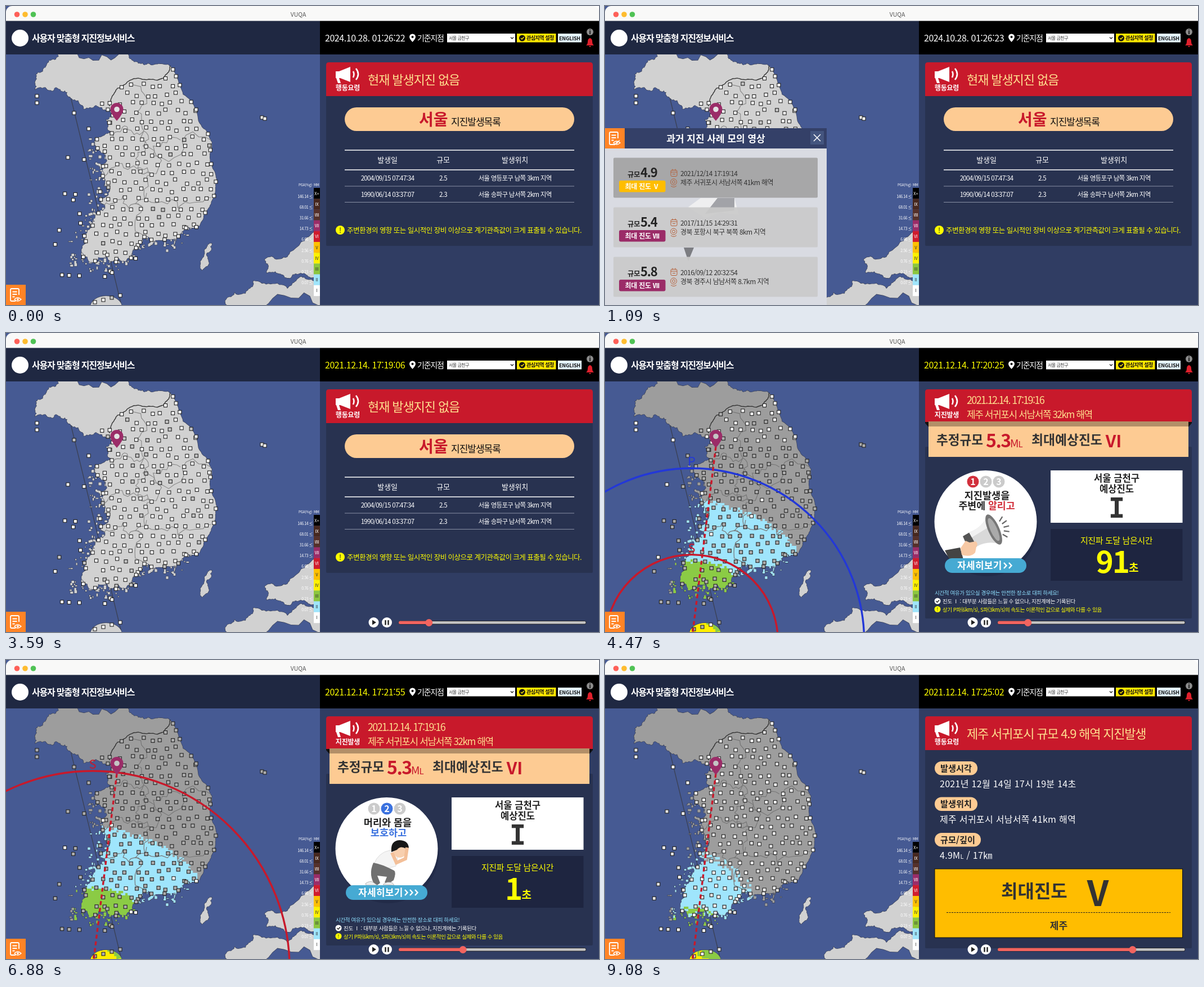
Animation, 1054 px wide and 531 px high, one loop 9.15 s. Source, as an HTML page with a canvas:

```html
<!DOCTYPE html>
<html lang="ko">
<meta charset="utf-8">
<style>
html,body{margin:0;width:1054px;height:531px;overflow:hidden;background:#fff}
canvas,svg{position:absolute;left:0;top:0}
svg{font-family:"Noto Sans CJK KR","Noto Sans CJK",sans-serif;white-space:pre}
</style>
<canvas id="map" width="558" height="531"></canvas>
<svg id="ui" width="1054" height="531"></svg>
<script>
const LOOP = 9150;
const $ = id => document.getElementById(id);
const show = (id, on) => $(id).setAttribute('display', on ? 'inline' : 'none');
const move = (id, y) => $(id).setAttribute('transform', `translate(0 ${y})`);
const hash = (a, b = 0) => { const v = Math.sin(a * 127.1 + b * 311.7) * 43758.5453; return v - Math.floor(v); };
let seed = 7;
const rnd = () => hash(seed++, 3);
const times = (n, f) => Array.from({ length: n }, (_, i) => f(i));

// ---------- markup helpers ----------
const T = (x, y, size, text, fill = '#fff', extra = '') => `<text x="${x}" y="${y}" font-size="${size}" fill="${fill}" ${extra}>${text}</text>`;
const R = (x, y, w, h, fill, rx = 0, extra = '') => `<rect x="${x}" y="${y}" width="${w}" height="${h}" fill="${fill}" rx="${rx}" ${extra}/>`;
const C = (x, y, r, fill, extra = '') => `<circle cx="${x}" cy="${y}" r="${r}" fill="${fill}" ${extra}/>`;
const P = (d, fill, stroke = 'none', w = 1) => `<path d="${d}" fill="${fill}" stroke="${stroke}" stroke-width="${w}"/>`;
const G = (id, body) => `<g id="${id}">${body}</g>`;
const L = (x, y, x2, color, w) => P(`M${x} ${y}H${x2}`, 'none', color, w);
const mid = 'text-anchor="middle" ', bold = 'font-weight="700" ', light = 'font-weight="300" ';
const ls = v => `letter-spacing="${v}" `;
const RED = '#c8192b', PEACH = '#fdcb93', CARD = '#283250', PALE = '#ffe08f', PURPLE = '#9b2c68', YELLOW = '#ffff00', INK = '#333';

// ---------- interface ----------
const header = R(0, 0, 1054, 40, '#f9f9f8', 11)
  + ['#fe6058', '#febc2f', '#4fc254'].map((c, i) => C(19.5 + i * 14.5, 15, 4.8, c)).join('')
  + T(519.5, 18.5, 10.5, 'VUQA', '#555', mid)
  + R(0, 26.5, 558, 59.5, '#1f2842') + R(558, 26.5, 496, 59.5, '#000') + R(558, 86, 496, 445, '#303d63')
  + C(25, 57, 15, '#fff')
  + T(46, 62.5, 16, '사용자 맞춤형 지진정보서비스', '#fff', bold + ls(-1.2))
  + `<text id="clock" x="567" y="63" font-size="16" letter-spacing="-.45"></text>`
  + P('M722.5 64Q717 58 717 55a5.5 5.5 0 0 1 11 0q0 3-5.5 9zM722.5 53a2 2 0 1 0 .1 0z', '#fff')
  + T(731, 62, 14, '기준지점', '#fff', ls(-1.2))
  + R(784, 49, 121, 15.5, '#fff') + T(787, 59.8, 8, '서울 금천구', INK, ls(-.5)) + P('M897 55.5l2.5 2.5 2.5-2.5', 'none', '#222', 1.3)
  + R(908, 49, 69.5, 15.5, '#ffe600') + C(917.5, 57, 5.5, '#111') + P('M915 57l2 2 3.5-4', 'none', '#ffe600', 1.4)
  + T(925, 60.3, 9, '관심지역 설정', '#111', bold + ls(-.5))
  + R(981, 49, 42, 15.5, '#e3f4fd') + T(1002, 60.5, 9, 'ENGLISH', '#111', mid + bold + ls(-.2))
  + C(1038, 46, 6, '#8b8b8b') + T(1038, 49.7, 10, 'i', '#000', mid + bold)
  + P('M1031 70q3-2 3-7t4-6q4 1 4 6t3 7zM1036 71h4q-2 4-4 0z', '#e0202c');

const legendNames = 'X+,Ⅸ,Ⅷ,Ⅶ,Ⅵ,Ⅴ,Ⅳ,Ⅲ,Ⅱ,Ⅰ'.split(',');
const legendColors = '#000,#46281f,#55302a,#9b2c68,#d01c2d,#ffc000,#fff100,#8cc63f,#9fe5fc,#fff'.split(',');
const pga = '146.14,68.01,31.66,14.73,6.66,2.56,0.76,0.23,0.07'.split(',');
const legend = T(520, 320, 6.2, 'PGA(%g)', '#fff', ls(-.2)) + T(547, 320, 6.2, 'MM', '#fff', ls(-.2))
  + legendNames.map((n, i) => R(547, 323 + i * 19.2, 11, 19.3, legendColors[i])
    + T(552.5, 335.5 + i * 19.2, 7.5, n, i < 5 ? '#fff' : INK, mid)).join('')
  + pga.map((v, i) => T(545, 340.5 + i * 19.2, 7, v + ' ≤', '#fff', 'text-anchor="end" ' + ls(-.4))).join('');

const horn = P('M586 116h6l20-8v27l-18-7h-2l3 9h-5l-3-9h-1z', '#fff')
  + P('M617 116q3 5 0 11M622 111q8 10 0 20', 'none', '#fff', 2.6);
const banner = (label, body) => P('M569 160v-55q0-5 5-5h464q5 0 5 5v55z', RED) + horn
  + T(607.5, 150, 12, label, '#fff', mid + bold + ls(-.2)) + body;
const bang = (x, y, r) => C(x, y, r, YELLOW) + T(x, y + r * .62, r * 1.6, '!', '#222', mid);

const row = (y, size, cells, gap) => cells.map((c, i) => T([678, 777, 904.5][i], y, size, c, '#fff', mid + ls(gap))).join('');
const rules = [256, 291, 320, 348.5].map((y, i) => L(602, y, 1010, i < 2 ? '#fff' : '#8990a5', i < 2 ? 1.5 : 1)).join('');
const idle = R(569, 150, 474, 276, CARD, 2)
  + banner('행동요령', T(643, 138.5, 22, '현재 발생지진 없음', PALE, light + ls(-1.1)))
  + R(602, 180, 408, 42, PEACH, 21) + T(734, 212, 28, '서울', RED, bold) + T(791, 212, 17, '지진발생목록', '#111', ls(-1))
  + rules + row(278, 13, ['발생일', '규모', '발생위치'], -.2)
  + row(310, 11.5, ['2004/09/15 07:47:34', '2.5', '서울 영등포구 남쪽 3km 지역'], -.7)
  + row(338.5, 11.5, ['1990/06/14 03:37:07', '2.3', '서울 송파구 남서쪽 2km 지역'], -.7)
  + bang(594, 398, 8)
  + T(606, 402.5, 12.5, '주변환경의 영향 또는 일시적인 장비 이상으로 계기관측값이 크게 표출될 수 있습니다.', YELLOW, ls(-.52));

const steps = (n, color) => [1, 2, 3].map(i => C(631 + 23 * i, 264, 10.5, i == n ? color : '#cbcbcb')
  + T(631 + 23 * i, 270, 16, i, '#fff', mid + bold)).join('');
const mouth = (rx, ry, fill) => `<ellipse cx="691" cy="349" rx="${rx}" ry="${ry}" fill="${fill}" transform="rotate(-24 691 349)"/>`;
const tipShout = steps(1, '#d2303c')
  + T(679, 295, 17.5, '지진발생을', '#222', mid + bold)
  + T(678.5, 313, 17.3, '주변에 <tspan fill="#d2303c">알리고</tspan>', '#222', mid + bold)
  + P('M604 386l27-5 6 21h-25z', '#444') + P('M636 361l12-7 13 25-15 5z', '#555')
  + P('M647 354q24-8 33-31l24 52q-24-7-43 4z', '#d9d9d9') + P('M647 354q24-8 33-31l8 18-36 22z', '#f1f1f1')
  + mouth(10, 29, '#777') + mouth(6, 22, '#aaa')
  + P('M632 382l9-13 7 3 11-2q5 4 1 10l-2 10q-8 9-24 4z', '#f7c9a5')
  + times(5, i => `<path d="M692 349m17 0h10" stroke="#666" stroke-width="2.2" transform="rotate(${i * 22 - 58} 692 349)"/>`).join('');
const tipCrouch = steps(2, '#3b72df')
  + T(678.5, 295, 17.5, '머리와 몸을', '#222', mid + bold) + T(680, 313, 17.5, '보호하고', '#3b72df', mid + bold)
  + P('M654 362q8-20 28-24l16 4-5 24-30 8z', '#f4f4f4', '#ddd') + C(700, 340, 11, '#f8cfae')
  + P('M685 341q-2-20 14-21 16 0 17 14l-5 1q-10-6-16 2z', '#171717')
  + P('M686 342l8 18 16-7 3-20', 'none', '#f3bf98', 6)
  + P('M653 360q14 2 37 14 4 3-1 17l-10 7-6-3 4-10-17-2 5 13-8 6q-14-20-4-42z', '#707070')
  + P('M639 397q8-6 14-2l7 5h-20zM670 399q7-7 17-3l3 4z', '#eee', '#999', .7);
const alert = R(569, 202, 474, 305, CARD, 2)
  + banner('지진발생', T(643, 126, 18, '2021.12.14. 17:19:16', PALE, light + ls(-1.65))
    + T(643, 151, 17, '제주 서귀포시 서남서쪽 32km 해역', PALE, light + ls(-1.4)))
  + P('M569 158h474v2l-6 7h-462l-6-7z', '#111') + R(575, 157, 462, 63, PEACH) + R(575, 157, 462, 9, '#b38f68')
  + T(589, 198, 22.6, '추정규모', INK, bold) + T(677, 203, 32, '5.3', RED, bold + ls(-1.5))
  + T(720, 203, 19, 'M<tspan font-size="15">L</tspan>', RED, light + ls(-1))
  + T(758, 198, 22.8, '최대예상진도', INK, bold) + T(904, 203, 30, 'Ⅵ', RED, mid + bold)
  + C(679, 341, 91, '#1c2440', 'opacity=".5"') + C(676.5, 335, 91, '#fff')
  + G('tip1', tipShout) + G('tip2', tipCrouch)
  + R(604, 400, 145, 26, '#46aad3', 13) + T(626, 418.5, 17, '자세히보기', '#fff', bold + ls(.3))
  + times(3, i => `<path id="arrow${i}" d="M${709 + i * 9} 408l4.5 5-4.5 5" fill="none" stroke="#fff" stroke-width="2.4"/>`).join('')
  + R(792, 244, 234.5, 93, '#fff') + T(909.5, 264, 16.6, '서울 금천구', '#222', mid + bold) + T(909.5, 283, 16.6, '예상진도', '#222', mid + bold)
  + T(909.5, 328, 49, 'I', INK, mid + bold + 'font-family="DejaVu Sans Mono,monospace" ')
  + R(792, 348, 234.5, 92, '#1e2540') + T(909, 374, 15, '지진파 도달 남은시간', YELLOW, mid + ls(-.4))
  + T(909.5, 425.5, 53, '<tspan id="left"></tspan><tspan font-size="19" dy="-2">초</tspan>', YELLOW, mid + bold + ls(-2))
  + T(586, 465, 9.5, '시간적 여유가 있으실 경우에는 안전한 장소로 대피 하세요!', '#8fe0ff', ls(-.35))
  + C(591, 476, 5.5, '#fff') + P('M588.5 476l2 2.2 3.5-4', 'none', '#222', 1.4)
  + T(600, 479.5, 9.5, '진도 Ⅰ : 대부분 사람들은 느낄 수 없으나, 지진계에는 기록된다', '#fff', ls(-.35))
  + bang(591, 490.5, 5.5)
  + T(600, 494.5, 9.5, '상기 P파(6km/s), S파(3km/s)의 속도는 이론적인 값으로 실제와 다를 수 있음', YELLOW, ls(-.5));

const field = (y, w, name, value) => R(586, y, w, 24.5, PEACH, 12) + T(586 + w / 2, y + 17.5, 15.2, name, '#222', mid + bold)
  + T(595, y + 45.5, 16, value, '#fff', ls(.3));
const report = R(569, 150, 474, 362, CARD, 2)
  + banner('행동요령', T(643, 138.5, 22, '제주 서귀포시 규모 4.9 해역 지진발생', PALE, light + ls(-1.2)))
  + field(180, 76, '발생시각', '2021년 12월 14일 17시 19분 14초')
  + field(243.5, 76, '발생위치', '제주 서귀포시 서남서쪽 41km 해역')
  + field(307, 82, '규모/깊이', '4.9M<tspan font-size="11">L</tspan> / 17㎞')
  + R(586, 371, 440.5, 122, '#ffbd00', 0, 'stroke="#111"')
  + T(704, 422, 32, '최대진도', INK, bold) + T(876, 437, 62, 'Ⅴ', INK, mid + bold)
  + `<path d="M607 448.5H1005" stroke="#222" stroke-dasharray="3 1.5"/>` + T(806.5, 477.5, 17, '제주', INK, mid + bold);

const player = C(653.5, 514, 9, '#fff') + P('M651 509.5l7 4.5-7 4.5z', '#222')
  + C(677, 514, 9, '#fff') + P('M674.5 510v8.5M679.5 510v8.5', 'none', '#222', 2.4)
  + R(698, 511.5, 333, 5.5, '#c3c3c3', 2.7, 'stroke="#111" stroke-width=".8"')
  + `<rect id="bar" x="698" y="511.5" height="5.5" rx="2.7" fill="#f2645f"/><circle id="knob" cy="514.5" r="6.5" fill="#f2645f"/>`;

// past events: the first one is hovered
const outline = 'stroke="#b5603a"';
const event = ([mag, roman, date, place], i) => {
  const y = 52.5 + 88 * i;
  return R(15, y, 363, 71, i ? '#cacaca' : '#a3a3a3', 2, 'opacity=".92"')
    + T(40, y + 34, 12.5, '규모', '#222', bold + ls(-.5)) + T(63, y + 34.5, 22, mag, '#222', bold + ls(-1.2))
    + R(25, y + 40.5, 82.5, 20.5, i ? PURPLE : '#ffbd00', 3) + T(66, y + 55.5, 12, '최대 진도 ' + roman, '#fff', mid + bold + ls(-.3))
    + R(117, y + 22, 11, 11, 'none', 2, outline) + P(`M117 ${y + 25.5}h11M120 ${y + 20}v3M125 ${y + 20}v3M120 ${y + 29}h5`, 'none', '#b5603a')
    + C(122, y + 43, 5.5, 'none', outline) + C(122, y + 43, 2.5, 'none', outline) + P(`M117 ${y + 50}q5 4 10 0`, 'none', '#b5603a')
    + T(134, y + 32, 12, date, INK, ls(-.6)) + T(134, y + 48.5, 12, place, INK, ls(-.6));
};
const body = R(0, 36, 394, 278, '#d9dbe2')
  + P('M170 124h60l8 30-34-4-26 10-30-20z', '#efeff0') + P('M200 124h30v22l-52 6z', '#a2a3a8') + P('M140 212h18l-10 24-4-12z', '#7c7d82')
  + [['4.9', 'Ⅴ', '2021/12/14 17:19:14', '제주 서귀포시 서남서쪽 41km 해역'],
    ['5.4', 'Ⅶ', '2017/11/15 14:29:31', '경북 포항시 북구 북쪽 8km 지역'],
    ['5.8', 'Ⅶ', '2016/09/12 20:32:54', '경북 경주시 남남서쪽 8.7km 지역']].map(event).join('');
const heading = R(0, 0, 394, 36, '#344068') + T(197, 24.5, 17, '과거 지진 사례 모의 영상', '#fff', mid + bold)
  + G('close', R(365, 5, 24, 24, '#44557f') + P('M371 11l12 12M383 11l-12 12', 'none', '#fff', 1.5));
const tab = R(0, 0, 35, 36, '#ff8426')
  + P('M17 29h-7q-2 0-2-2V9q0-2 2-2h11q2 0 2 2v9M11.5 12.5h8M11.5 17h8M11.5 21.5h4', 'none', '#fff', 1.8)
  + P('M15 26q5.500-6 12 0-6.500 6-12 0z', '#ff8426', '#fff', 1.4) + C(21, 26, 1.8, '#fff')
  + G('slash', P('M16 30l10-8.500', 'none', '#fff', 1.5));

$('ui').innerHTML = legend + G('list', G('body', body) + G('heading', heading)) + G('tab', tab) + header
  + G('idle', idle) + G('alert', alert) + G('report', report) + G('player', player);

// ---------- map ----------
const g = $('map').getContext('2d');
// midpoint displacement; amp(x) sets how ragged the line gets
const rough = (pts, amp, closed) => {
  for (let n = 0; n < 4; n++) pts = pts.flatMap((p, i) => {
    const q = pts[i + 1] || (closed ? pts[0] : null);
    if (!q) return [p];
    const k = (rnd() - .5) * amp(p[0]);
    return [p, [(p[0] + q[0]) / 2 - (q[1] - p[1]) * k, (p[1] + q[1]) / 2 + (q[0] - p[0]) * k]];
  });
  return pts;
};
const toPath = (pts, closed) => {
  const p = new Path2D();
  pts.forEach(q => p.lineTo(...q));
  if (closed) p.closePath();
  return p;
};
const ragged = x => x < 260 ? .62 : .2;
const coast = rough([[95, 80], [72, 106], [54, 126], [52, 148], [92, 146], [122, 166], [160, 176], [188, 180], [178, 202], [188, 226],
  [158, 246], [176, 280], [172, 302], [184, 330], [172, 364], [154, 390], [136, 430], [150, 455], [180, 442], [204, 452], [230, 430],
  [246, 410], [262, 418], [302, 414], [320, 394], [344, 390], [366, 345], [373, 312], [362, 270], [366, 242], [338, 184], [302, 124],
  [288, 104], [250, 104], [222, 94], [214, 80]], ragged, true);
const korea = toPath(coast, true);
korea.ellipse(178, 535, 28, 20, 0, 0, 7);
const isSouthWest = ([x, y]) => y > 235 && (x < 215 || y > 385) && x < 330;
// islets are wound like the coast, so overlaps stay filled
const isles = new Path2D();
coast.filter(isSouthWest).forEach(([x, y]) => {
  isles.rect(x + (rnd() - .7) * 34, y + (rnd() - .35) * 26, -1 - rnd() * 4, 1 + rnd() * 4);
});
const abroad = [
  [[565, 396], [545, 403], [505, 437], [460, 450], [464, 474], [500, 483], [530, 474], [565, 484]],
  [[565, 486], [530, 482], [500, 502], [440, 488], [430, 505], [390, 527], [400, 540], [565, 540]],
  [[366, 422], [352, 445], [348, 469], [358, 462]]
].map(a => toPath(rough(a, () => .45, true), true));
const provinces = [
  [[190, 232], [245, 222], [220, 136]], [[245, 222], [364, 238]], [[245, 222], [235, 292], [258, 298]],
  [[176, 302], [258, 298], [310, 238]], [[258, 298], [246, 408]], [[174, 354], [240, 356]], [[250, 332], [364, 340]]
].map(a => toPath(rough(a, () => .75)));
const border = toPath(rough([[184, 178], [198, 146], [220, 132], [280, 128], [292, 106]], () => .25));

// stations: a jittered grid on land, the coastline, and a scatter at sea
const isSouth = (x, y) => x < 168 ? y > 236 : y > (x < 200 ? 166 : x < 270 ? 138 : 110);
const stations = [[55, 160], [55, 172], [121, 190], [455, 198], [460, 200], [110, 269], [147, 218]];
for (let y = 126, r = 0; y < 450; y += 15.5, r++)
  for (let x = 160 + r % 2 * 9; x < 368; x += 18) {
    const px = x + (rnd() - .5) * 8, py = y + (rnd() - .5) * 8;
    if (isSouth(px, py) && g.isPointInPath(korea, px, py)) stations.push([px, py]);
  }
coast.forEach(([x, y], i) => { if (i % 12 == 0 && isSouth(x, y)) stations.push([x, y]); });
times(34, () => [82 + rnd() * 150, 262 + rnd() * 222])
  .filter(([x, y]) => x + y > 400 && !g.isPointInPath(korea, x, y)).forEach(p => stations.push(p));
times(4, i => stations.push([158 + i * 15, 526 - i * 4]));

const EPI = [154, 547], PIN = [197, 202];
// blocky intensity areas: cells whose noisy distance from the epicentre falls within a band
const zones = (bands, noise, squeeze) => bands.map(([r, color], i) => {
  const p = new Path2D();
  for (let y = 290; y < 531; y += 4) for (let x = 120; x < 380; x += 4) {
    const d = Math.hypot((x + 2 - EPI[0]) * squeeze, y + 2 - EPI[1]) + (hash(x >> 2, y >> 2) - .5) * noise;
    if (d < r && d >= (bands[i + 1] || [0])[0]) p.rect(x, y, 4.2, 4.2);
  }
  return [p, color];
});
const BLUE = '#9fe5fc', GREEN = '#8bcb45', GOLD = '#ffee00';
const areas = [[],
  zones([[248, BLUE], [143, GREEN], [46, GOLD]], 10, 1),
  zones([[200, BLUE], [102, GREEN], [36, GOLD]], 26, 1.4)];

function ring(r, color, name) {
  g.strokeStyle = g.fillStyle = color;
  g.lineWidth = 3.4;
  g.beginPath();
  g.arc(...EPI, r, 0, 7);
  g.stroke();
  g.font = '22px "Noto Sans CJK KR",sans-serif';
  g.textAlign = 'center';
  g.fillText(name, EPI[0], EPI[1] - r - 4);
}

// share of stations still quiet (white) in each scene; the shaking turns them grey
function tone(i, y, mode, s, tick) {
  const quiet = mode == 0 ? (s || tick > 9 ? .86 : .95) : mode == 2 ? .4 : s < 170 && y < 200 ? .8 : .04;
  return hash(i + 1, tick) < quiet ? '#fff' : ['#c4c4c4', '#adadad', '#e2e2e2'][mode];
}

function drawMap(mode, s, elapsed, tick) {
  g.fillStyle = '#465a93';
  g.fillRect(0, 0, 558, 531);
  g.lineWidth = 1.3;
  g.strokeStyle = '#3a4054';
  const land = mode ? '#9d9d9d' : '#d1d1d1';
  const fill = (p, color) => { g.fillStyle = color; g.stroke(p); g.fill(p); };
  abroad.forEach(p => fill(p, '#d1d1d1'));
  fill(isles, land);
  fill(korea, land);
  g.save();
  const ground = new Path2D(korea);
  ground.addPath(isles);
  g.clip(ground);
  areas[mode].forEach(([p, color]) => { g.fillStyle = color; g.fill(p); });
  g.restore();
  g.lineWidth = 1.2;
  g.strokeStyle = mode ? '#777' : '#8c8c8c';
  provinces.forEach(p => g.stroke(p));
  g.strokeStyle = INK;
  g.lineWidth = 1.4;
  g.stroke(border);
  g.lineWidth = 1.1;
  g.strokeStyle = '#222';
  stations.forEach(([x, y], i) => {
    g.fillStyle = tone(i, y, mode, s, tick);
    g.fillRect(x - 3, y - 3, 6, 6);
    g.strokeRect(x - 3, y - 3, 6, 6);
  });
  if (mode == 1) {
    ring(elapsed * 4.392, '#2338d8', 'P');
    ring(elapsed * 2.196, RED, 'S');
  }
  if (mode) {
    g.strokeStyle = RED;
    g.lineWidth = 3.4;
    g.setLineDash([7, 5]);
    g.stroke(toPath([PIN, EPI]));
    g.setLineDash([]);
  }
  g.fillStyle = PURPLE;
  g.fill(new Path2D('M197 204Q185.500 191 185.500 183.500a11.500 11.500 0 0 1 23 0Q208.500 191 197 204z'));
  g.fillStyle = mode ? '#c4c4c4' : '#e3e3e3';
  g.beginPath();
  g.arc(197, 183.5, 4.8, 0, 7);
  g.fill();
}

// ---------- timeline ----------
// seeks: [start ms, seconds after 17:19:05]; the replay clock then runs on
const seeks = [[1600, 0], [3640, 80], [5480, 169], [7230, 356]], TICK = 1050;
const replay = t => {
  const seek = seeks.filter(p => p[0] <= t).pop();
  return seek && { s: seek[1] + Math.floor((t - seek[0]) / TICK), exact: seek[1] + (t - seek[0]) / 1000 };
};
const pad = n => String(n).padStart(2, '0');

// the CSS "ease" curve
function ease(x) {
  x = Math.min(1, Math.max(0, x));
  let lo = 0, hi = 1, u;
  const bez = (a, b) => 3 * (1 - u) * (1 - u) * u * a + 3 * (1 - u) * u * u * b + u * u * u;
  for (let i = 0; i < 20; i++) {
    u = (lo + hi) / 2;
    bez(.25, .25) < x ? lo = u : hi = u;
  }
  return bez(.1, 1);
}

function draw(t) {
  const now = replay(t), s = now ? now.s : 0;
  const mode = s < 80 ? 0 : s < 300 ? 1 : 2;
  drawMap(mode, s, now ? now.exact - 11 : 0, now ? 10 + s : (t >= 70) + (t >= 140) + (t >= 700));

  const isOpen = t >= 470 && t < 1560;
  const open = t < 470 ? 0 : isOpen ? ease((t - 445) / 600) : 1 - ease((t - 1500) / 600);
  move('heading', 531 - 314 * open);
  move('body', 495 - 278 * open);
  move('tab', 495 - 278 * open);
  show('list', open > 0);
  show('close', isOpen);
  show('slash', isOpen);

  const sec = 19 * 60 + 5 + s;
  $('clock').textContent = now ? `2021.12.14. 17:${pad(Math.floor(sec / 60))}:${pad(sec % 60)}` : `2024.10.28. 01:26:${t < 700 ? 22 : 23}`;
  $('clock').setAttribute('fill', now ? YELLOW : '#fff');

  ['idle', 'alert', 'report'].forEach((id, i) => show(id, i == mode));
  $('left').textContent = Math.max(0, 171 - s);
  show('tip1', t < 6400);
  show('tip2', t >= 6400);
  const arrows = (Math.floor(t / 250) + 2) % 3;
  times(3, i => show('arrow' + i, i <= arrows));

  // the handle jumps slightly before the scene follows
  show('player', !!now);
  const x = .6716 * (replay(t + 60) || { s: 0 }).s;
  $('bar').setAttribute('width', x);
  $('knob').setAttribute('cx', 698 + x);
}

const start = performance.now();
(function tick() {
  draw((performance.now() - start) % LOOP);
  requestAnimationFrame(tick);
})();
</script>
</html>
```
